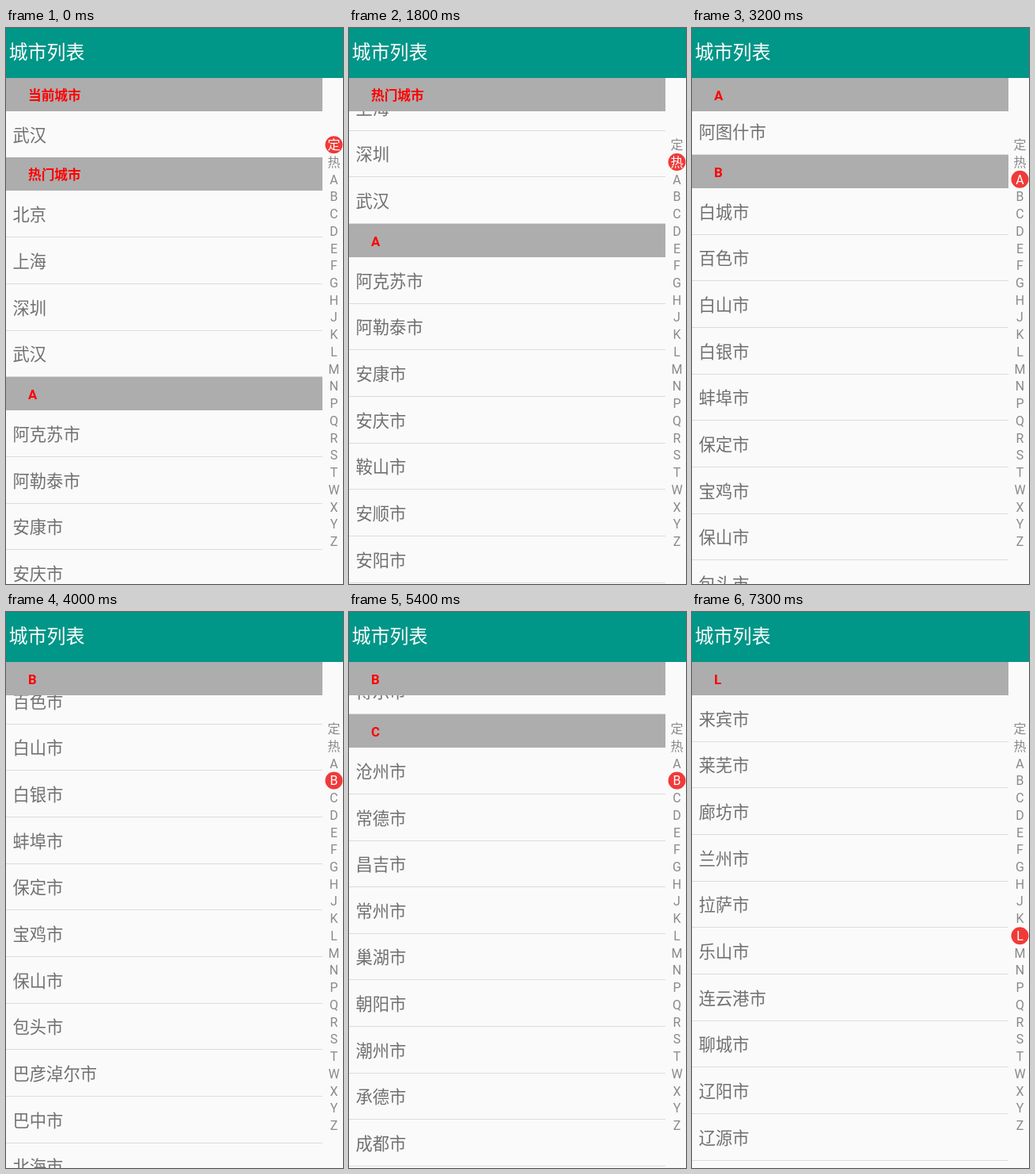
An HTML page for the animation above (8000 ms loop, 426x701 px).

```html
<!DOCTYPE html>
<html lang="zh-CN">
<head>
<meta charset="utf-8">
<title>城市列表</title>
<style>
  html, body { margin: 0; width: 100%; height: 100%; overflow: hidden; background: #fafafa; }
  svg { display: block; font-family: Roboto, "Noto Sans CJK SC", "Noto Sans CJK", sans-serif; }
  .row { font-size: 21.3px; fill: #707070; }
  .head { font-size: 16.7px; font-weight: 700; fill: #f00; }
  .index { font-size: 16px; fill: #8a8a8a; text-anchor: middle; }
  .index.on { fill: #fff; }
</style>
</head>
<body>
<svg id="stage" width="426" height="701" viewBox="0 0 426 701">
  <rect width="426" height="701" fill="#fafafa"/>
  <clipPath id="view"><rect y="63" width="400" height="638"/></clipPath>
  <g id="list" clip-path="url(#view)"></g>
  <g id="side"></g>
  <rect width="426" height="63" fill="#009688"/>
  <text x="3.5" y="39" font-size="24" fill="#fff">城市列表</text>
  <g id="toast">
    <rect x="169" y="352" width="90" height="91" rx="4" fill="#000" fill-opacity=".4"/>
    <text x="214" y="412" font-size="40" fill="#fff" text-anchor="middle">L</text>
  </g>
</svg>
<script>
const LOOP = 8000, TOP = 63, HEAD = 42, ROW = 58.65, JUMP = 7100, TOAST_END = 7300;
const letters = [...'定热ABCDEFGHJKLMNPQRSTWXYZ'];
const sections = [
  ['定', '当前城市', '武汉'],
  ['热', '热门城市', '北京 上海 深圳 武汉'],
  ['A', 'A', '阿克苏市 阿勒泰市 安康市 安庆市 鞍山市 安顺市 安阳市 澳门特别行政区 阿图什市'],
  ['B', 'B', '白城市 百色市 白山市 白银市 蚌埠市 保定市 宝鸡市 保山市 包头市 巴彦淖尔市 巴中市 ' +
    '北海市 北京市 本溪市 毕节市 滨州市 博乐市'],
  ['C', 'C', '沧州市 常德市 昌吉市 常州市 巢湖市 朝阳市 潮州市 承德市 成都市 郴州市 赤峰市 ' +
    '池州市 崇左市 滁州市'],
  ['D', 'D', '大连市 丹东市 大庆市 大同市 达州市 德阳市 德州市 东莞市 东营市'],
  ['L', 'L', '来宾市 莱芜市 廊坊市 兰州市 拉萨市 乐山市 连云港市 聊城市 辽阳市 辽源市 临沧市']
];

// Repaint moments in tenths of a second
const ticks = [0, 13, 15, 16, 18, 19, 21, 22, 24, 25, 27, 29, 30, 32, 34, 35, 36, 38, 40, 41, 42,
  44, 46, 47, 48, 50, 51, 52, 54, 56, 57, 59, 60, 62, 64, 65];
// Scroll position over time: [ms, px]
const path = [[0, 0], [1300, 29], [1500, 85], [1600, 125], [2200, 330], [2400, 421.4],
  [3200, 850], [3400, 948], [3600, 985], [4000, 1027.7], [4400, 1140], [4600, 1270],
  [5000, 1701], [5400, 1920], [5600, 2010], [6000, 2428], [6500, 2660]];

const $ = id => document.getElementById(id);
function add(parent, tag, attrs, text) {
  const el = document.createElementNS('http://www.w3.org/2000/svg', tag);
  for (const k in attrs) el.setAttribute(k, attrs[k]);
  if (text) el.textContent = text;
  return parent.appendChild(el);
}
const move = (el, y) => el.setAttribute('transform', `translate(0 ${y})`);

function makeHead(label) {
  const g = add($('list'), 'g', {});
  add(g, 'rect', { width: 400, height: HEAD, fill: '#adadad' });
  add(g, 'text', { x: 28, y: 27.5, class: 'head' }, label);
  return g;
}

const items = [], heads = [];
let end = 0;
for (const [key, label, names] of sections) {
  heads.push({ key, label, y: end });
  items.push({ el: makeHead(label), y: end, h: HEAD });
  end += HEAD;
  for (const name of names.split(' ')) {
    const g = add($('list'), 'g', {});
    add(g, 'text', { x: 8.5, y: 37.5, class: 'row' }, name);
    add(g, 'rect', { y: 58, width: 400, height: 1, fill: '#dcdcdc' });
    items.push({ el: g, y: end, h: ROW });
    end += ROW;
  }
}
const sticky = makeHead('');
const stickyText = sticky.querySelector('text');

const dot = add($('side'), 'circle', { cx: 414.5, r: 11, fill: '#f03a38' });
const letterY = i => 147.3 + i * 500 / 23;
const marks = letters.map((c, i) =>
  add($('side'), 'text', { x: 414.5, y: letterY(i) + 5.8, class: 'index' }, c));

function scrollAt(t) {
  if (t >= JUMP) return heads[heads.length - 1].y;
  const now = 100 * ticks.filter(k => k * 100 <= t).pop();
  const i = path.findIndex(p => p[0] >= now);
  const [t1, y1] = path[i];
  if (t1 === now) return y1;
  const [t0, y0] = path[i - 1];
  return y0 + (y1 - y0) * (now - t0) / (t1 - t0);
}

function draw(t) {
  const scroll = scrollAt(t);
  for (const it of items) {
    const y = TOP + it.y - scroll;
    const seen = y < 701 && y + it.h > TOP;
    it.el.style.display = seen ? '' : 'none';
    if (seen) move(it.el, Math.round(y - 0.3));
  }
  const n = heads.filter(h => h.y <= scroll + 0.01).length - 1;
  const next = heads[n + 1];
  const push = next ? Math.min(0, next.y - scroll - HEAD) : 0;
  move(sticky, Math.round(TOP + push));
  stickyText.textContent = heads[n].label;

  const on = letters.indexOf(heads[n].key);
  dot.setAttribute('cy', letterY(on));
  marks.forEach((m, i) => m.classList.toggle('on', i === on));
  $('toast').style.display = t >= JUMP && t < TOAST_END ? '' : 'none';
}

function tick() {
  draw(performance.now() % LOOP);
  requestAnimationFrame(tick);
}
tick();
</script>
</body>
</html>
```
